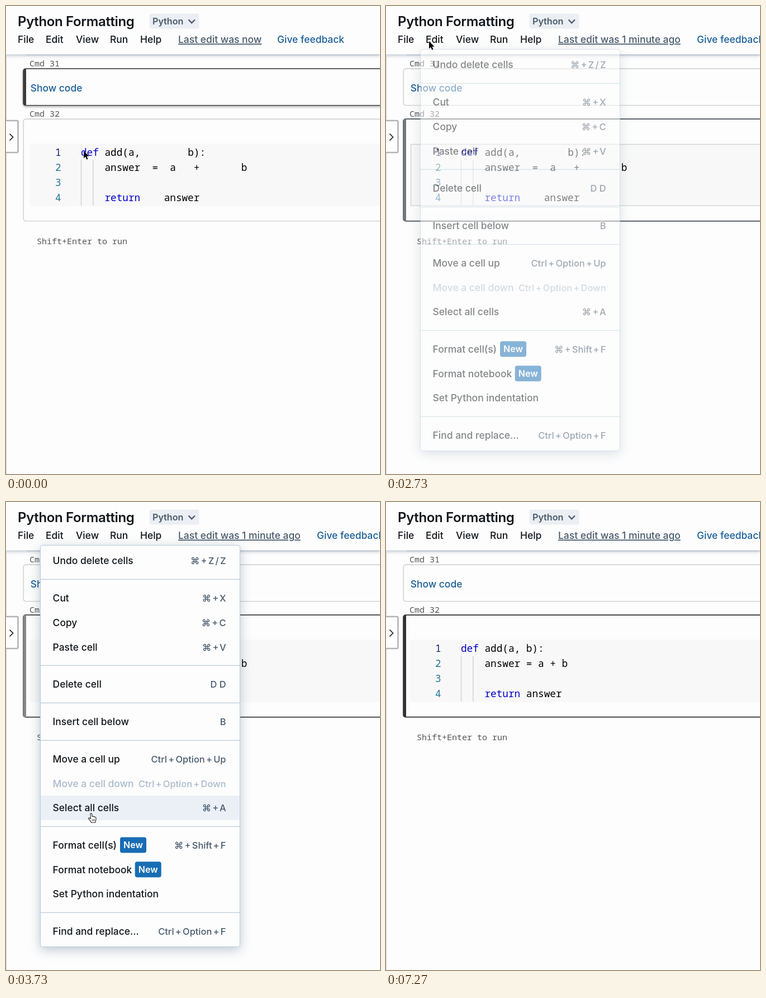
Recreate the animation shown at these times as an HTML page. Size 669 by 837 pixels, loop 7410 ms.

```html
<!DOCTYPE html>
<html lang="en">
<head>
<meta charset="utf-8">
<title>Notebook formatting</title>
<style>
html, body { margin: 0; width: 669px; height: 837px; overflow: hidden; background: #fdfdfd; }
svg { display: block; }
text { font: 450 17.45px Inter, "Noto Sans", sans-serif; fill: #11171c; white-space: pre; }
.title { font-size: 24px; font-weight: 600; letter-spacing: -.35px; }
.lang { font-size: 16.1px; font-weight: 600; fill: #485a6c; }
.edit { fill: #485a6c; text-decoration: underline; text-decoration-thickness: 1px; text-underline-offset: 2px; }
.link { fill: #1a5f99; }
.mono { font: 15px "Noto Sans Mono", "DejaVu Sans Mono", monospace; fill: #555; }
.code { font: 17.7px "Noto Sans Mono", "DejaVu Sans Mono", monospace; fill: #000; }
.num { text-anchor: end; fill: #237893; }
.num.on { fill: #0b216f; }
.kw { fill: #0000c4; }
.keys { font-size: 16.4px; text-anchor: end; fill: #485a6c; }
.off { fill: #a9bacb; }
.new { font-size: 16px; font-weight: 600; fill: #fff; text-anchor: middle; }
.hover { filter: drop-shadow(0 2px 2px rgba(0, 0, 0, .35)); }
#head { filter: drop-shadow(0 2px 3px rgba(70, 100, 130, .4)); }
#panel { filter: drop-shadow(0 5px 10px rgba(27, 60, 100, .28)); }
</style>
</head>
<body>
<svg id="stage" width="669" height="837" viewBox="0 0 669 837"></svg>
<script>
const LOOP = 7410, COL = 10.62, CODE_X = 134;

const label = (x, y, s, cls = '', id = '') => `<text x="${x}" y="${y}" class="${cls}" id="${id}">${s}</text>`;
const box = (x, y, w, h, fill, extra = '') => `<rect x="${x}" y="${y}" width="${w}" height="${h}" fill="${fill}" ${extra}/>`;
const line = (d, color, w = 1) => `<path d="${d}" fill="none" stroke="${color}" stroke-width="${w}"/>`;

// One look of a notebook cell: frame, optional left band, optional shadow
function cell(id, y, h, color, { band = '', width = 1.4, hover = false } = {}) {
  const frame = box(31.2, y + .2, 660, h - .6, '#fdfdfd',
    `rx="4" stroke="${color}" stroke-width="${width}" class="${hover ? 'hover' : ''}"`);
  const edge = band && `<path d="M36 ${y}H34.5Q30.6 ${y} 30.6 ${y + 4}V${y + h - 4}Q30.6 ${y + h} 34.5 ${y + h}H36Z" fill="${band}"/>`;
  return `<g id="${id}">${frame}${edge}</g>`;
}

// Code lines as [row, column, text, class]
const baseline = row => 267.5 + 27.3 * row;
const code = (id, tokens) => `<g id="${id}">` + tokens.map(([row, col, s, cls = '']) =>
  label(CODE_X + col * COL, baseline(row), s, 'code ' + cls)).join('') + '</g>';

// Menu rows as [centre, label, shortcut]
const rows = [
  [105, 'Undo delete cells', '⌘+Z/Z'], [172, 'Cut', '⌘+X'], [215.8, 'Copy', '⌘+C'],
  [259.5, 'Paste cell', '⌘+V'], [326, 'Delete cell', 'D D'], [393, 'Insert cell below', 'B'],
  [460, 'Move a cell up', 'Ctrl+Option+Up'], [503.5, 'Move a cell down', 'Ctrl+Option+Down'],
  [547, 'Select all cells', '⌘+A'], [613.7, 'Format cell(s)', '⌘+Shift+F'],
  [657.3, 'Format notebook', ''], [701, 'Set Python indentation', ''],
  [768, 'Find and replace...', 'Ctrl+Option+F']
];
const isOff = row => row[1].endsWith('cell down');
const spread = keys => keys.replace(/[+\/](.)/g, (m, next) =>
  `<tspan dx="2.3">${m[0]}</tspan><tspan dx="2.3">${next}</tspan>`);
const badge = (x, y) => box(x, y, 47, 28, '#186db3', 'rx="4"') + label(x + 23.5, y + 19.8, 'New', 'new');

const menu = `<g id="menu">
  ${box(61.5, 77.5, 357, 718, '#fdfdfd', 'id="panel" rx="4" stroke="#b6cbd9"')}
  ${box(62, 0, 356, 43.6, '#ebf0f7', 'id="mark"')}
  ${[138, 292, 359, 426, 580, 734].map(y => line(`M62 ${y + .3}H418`, '#b9cddb', 1.3)).join('')}
  ${rows.map(row => {
    const off = isOff(row) ? ' off' : '';
    return label(83.6, row[0] + 6.3, row[1], off) + label(393.5, row[0] + 6, spread(row[2]), 'keys' + off);
  }).join('')}
  ${badge(204, 599.6)}${badge(230.7, 643.2)}
</g>`;

document.getElementById('stage').innerHTML = `
  ${box(0, 0, 669, 837, '#fdfdfd')}
  ${line('M.5 87V837', '#cfcfcf')}
  ${label(42, 108, 'Cmd 31', 'mono')}${label(42, 198, 'Cmd 32', 'mono')}
  ${cell('topIdle', 112, 66, '#cdcdcd')}
  ${cell('topHover', 112, 66, '#8c8c8c', { hover: true })}
  ${cell('topOn', 112, 66, '#3a3a3a', { band: '#3a3a3a', hover: true })}
  ${label(43.7, 153.3, 'Show code', 'link')}
  ${cell('lowIdle', 202, 183, '#cdcdcd')}
  ${cell('lowHover', 202, 183, '#8c8c8c', { hover: true })}
  ${cell('lowEdit', 202, 183, '#17598f', { band: '#17598f', width: 1.8 })}
  ${cell('lowOn', 202, 183, '#333', { band: '#333', width: 1.8 })}
  ${cell('lowDim', 202, 183, '#555', { band: '#858585', width: 1.8 })}
  ${box(43, 246, 640, 112, '#f8f8f8')}
  ${box(44.5, 247.5, 640, 109.5, 'none', 'id="focus" stroke="#a9a9a9" stroke-width="1.3"')}
  ${line('M134.5 247V275', '#e9e9e9')}${line('M134.5 275V357M155.9 275V357', '#cacaca', 1.2)}
  ${[0, 1, 2, 3].map(i => label(98.5, baseline(i), i + 1, 'code num' + (i ? '' : ' on'))).join('')}
  ${code('loose', [[0, 0, 'def', 'kw'], [0, 4, 'add(a,'], [0, 18, 'b):'], [1, 4, 'answer'], [1, 12, '='],
    [1, 15, 'a'], [1, 19, '+'], [1, 27, 'b'], [3, 4, 'return', 'kw'], [3, 14, 'answer']])}
  ${code('neat', [[0, 0, 'def', 'kw'], [0, 4, 'add(a, b):'], [1, 4, 'answer = a + b'],
    [3, 4, 'return', 'kw'], [3, 11, 'answer']])}
  ${box(134, 248, 2.6, 26.5, '#000', 'id="caret"')}
  ${label(55, 426.3, 'Shift+Enter to run', 'mono')}
  ${box(-6, 205, 27.5, 57, '#fdfdfd', 'rx="2" stroke="#b4b4b4" stroke-width="2.6"')}
  ${line('M6.5 228.5L12.5 234.5L6.5 240.5', '#222', 1.7)}
  ${line('M37 87.5H669', '#cfd4d8')}
  ${box(0, -10, 669, 96.5, '#fdfdfd', 'id="head"')}
  ${label(21, 36.3, 'Python Formatting', 'title')}
  ${box(256.5, 13.5, 89, 27, '#ebeff4', 'rx="4"')}
  ${label(262, 33, 'Python', 'lang')}${line('M326.5 24.5L332.2 30.3L337.9 24.5', '#485a6c', 2.4)}
  ${[[21, 'File'], [71, 'Edit'], [125, 'View'], [186, 'Run'], [240, 'Help']].map(([x, s]) => label(x, 66.3, s)).join('')}
  ${label(308, 66.3, '', 'edit', 'edited')}${label(485, 66.3, 'Give feedback', 'link', 'feedback')}
  ${menu}
  <g id="pointer">
    <path id="arrow" d="M0 0V13.5L3.1 10.6L5.3 15.6L7.5 14.6L5.4 9.8H9.5Z" stroke="#fff" stroke-width="1" paint-order="stroke"/>
    <g id="hand" stroke="#222" stroke-width="1.1" stroke-linejoin="round">
      <path fill="#fff" d="M-1.6 1.6C-1.6 -.2 1 -.2 1.2 1.6L1.8 6C2.5 5 4 5.3 4.2 6.4C5 5.7 6.3 6.1 6.5 7.2C7.5 6.7 8.6 7.4 8.6 8.6C8.8 11 8.4 12.6 7.6 14L7.4 16.6H0C-1 14.5 -3 12 -4.8 9.8C-5.4 8.5 -3.8 7.6 -2.7 8.6L-1 10Z"/>
      <path fill="none" stroke-width=".8" d="M1.8 10.5V14M3.8 10.5V14M5.8 10.5V14"/>
    </g>
  </g>`;

const el = id => document.getElementById(id);
const fade = (id, a) => { el(id).style.opacity = a; };
const ramp = (t, from, to) => Math.max(0, Math.min(1, (t - from) / (to - from)));
const during = (t, a, b, c, d) => ramp(t, a, b) * (1 - ramp(t, c, d));

// Pointer path: time, x, y; repeated points are rests
const path = [
  [0, 139, 259], [1470, 139, 259], [2000, 97, 104], [2200, 80, 67], [2330, 77, 63], [2850, 77, 63],
  [3370, 113, 136], [3420, 113, 136], [3570, 150, 348], [3850, 150, 634], [3880, 150, 634],
  [4170, 140, 595], [4300, 140, 595], [4570, 138, 608], [LOOP, 138, 608]
];
const same = (a, b) => a[1] === b[1] && a[2] === b[2];

function speed(i, axis) {
  const prev = path[i - 1], here = path[i], next = path[i + 1];
  if (!prev || !next || same(prev, here) || same(here, next)) return 0;
  return (next[axis] - prev[axis]) / (next[0] - prev[0]);
}

function along(t, axis) {
  let i = 0;
  while (i < path.length - 2 && t >= path[i + 1][0]) i++;
  const a = path[i], b = path[i + 1], span = b[0] - a[0], u = (t - a[0]) / span;
  const s = u * u * (3 - 2 * u);
  return a[axis] + (b[axis] - a[axis]) * s
    + span * u * (1 - u) * (speed(i, axis) * (1 - u) - speed(i + 1, axis) * u);
}

// The row nearest the pointer, trailing it slightly
function markedRow(y) {
  const gap = row => Math.abs(row[0] - (y - 10));
  return rows.filter(r => !isOff(r)).reduce((best, row) => gap(row) < gap(best) ? row : best);
}

function draw(t) {
  const x = along(t, 1), y = along(t, 2);
  const picked = ramp(t, 700, 830), open = during(t, 2670, 2790, 4730, 4850);
  const menuClick = ramp(t, 2670, 2790);

  fade('topOn', 1 - picked);
  fade('topHover', during(t, 1700, 1790, 2120, 2200));
  fade('lowHover', during(t, 270, 370, 1640, 1730));
  fade('lowEdit', picked * (1 - menuClick));
  fade('lowOn', menuClick);
  fade('lowDim', open);
  fade('focus', picked * (1 - menuClick));
  fade('caret', (t >= 730 && t < 1230) || (t >= 1730 && t < 2200) ? 1 : 0);

  const later = t >= 1000;
  el('edited').textContent = later ? 'Last edit was 1 minute ago' : 'Last edit was now';
  el('feedback').setAttribute('x', later ? 556 : 485);

  const neat = t >= 5040;
  fade('loose', neat ? 0 : 1);
  fade('neat', neat ? 1 : 0);

  fade('menu', open);
  fade('mark', y > 80 ? 1 : 0);
  el('mark').setAttribute('y', markedRow(y)[0] - 21.8);

  const inMenu = open > .5 && y > 77;
  fade('hand', inMenu ? 1 : 0);
  fade('arrow', inMenu ? 0 : 1);
  fade('pointer', 1 - ramp(t, 6000, 6300));
  el('pointer').setAttribute('transform', `translate(${x.toFixed(2)} ${y.toFixed(2)})`);
}

const start = performance.now();
function tick() {
  draw((performance.now() - start) % LOOP);
  requestAnimationFrame(tick);
}
tick();
</script>
</body>
</html>
```
